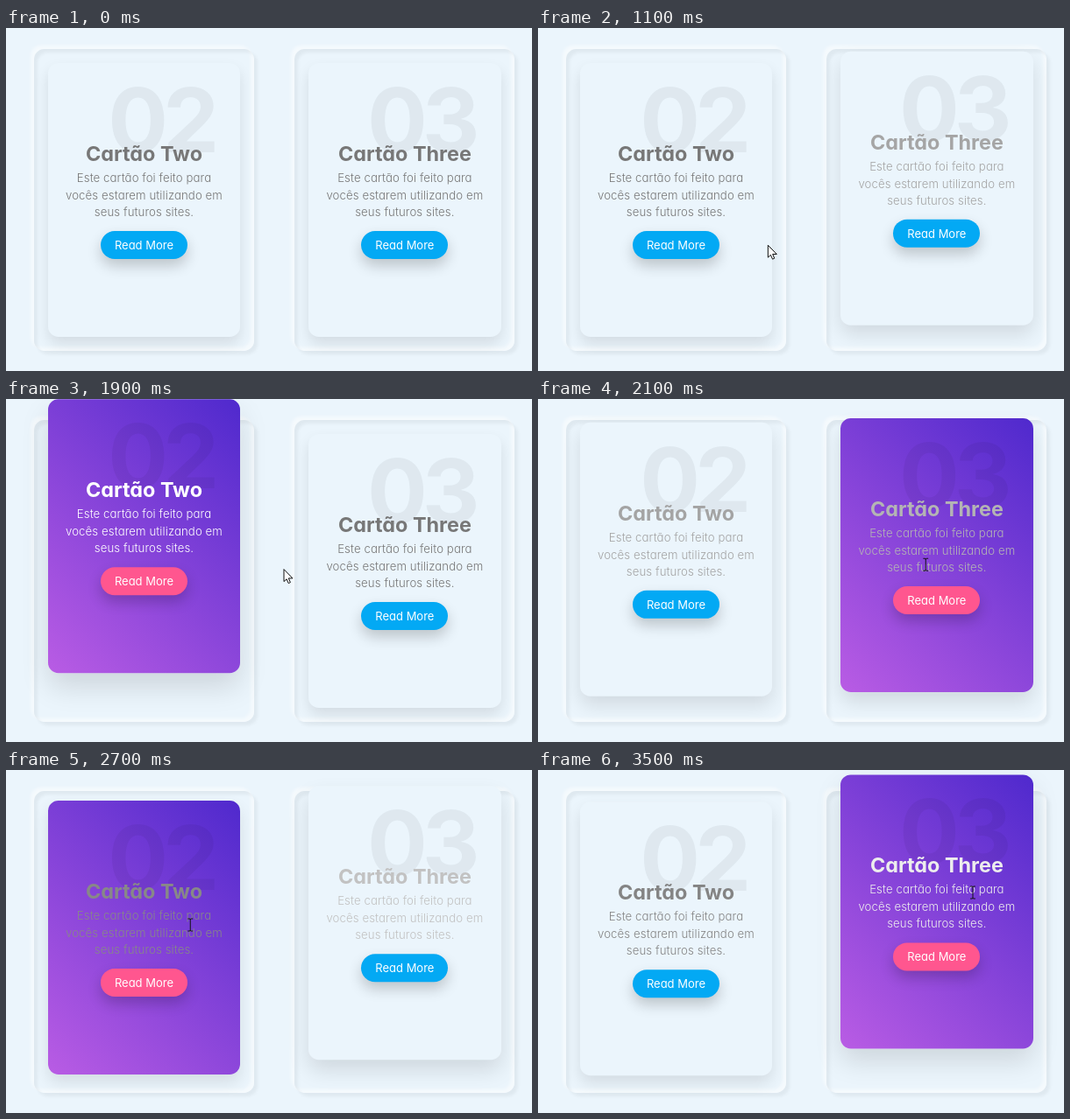
Animation of 600 by 392 pixels, one loop 3600 ms. Source, as an HTML page:

```html
<!DOCTYPE html>
<html lang="pt">
<head>
<meta charset="utf-8">
<title>Cards</title>
<style>
  html, body { margin: 0; width: 100%; height: 100%; overflow: hidden; background: #ebf5fc; }
  body {
    position: relative;
    font-family: Inter, "Open Sans", sans-serif;
    font-feature-settings: "cv11";
    font-optical-sizing: none;
  }
  .card {
    position: absolute; top: 24px; width: 251px; height: 345px; border-radius: 11.8px;
    box-shadow:
      inset 3.9px 3.9px 3.9px rgba(0,0,0,.05), inset -3.9px -3.9px 3.9px rgba(255,255,255,.5),
      3.9px 3.9px 3.9px rgba(0,0,0,.05), -3.9px -3.9px 3.9px rgba(255,255,255,.5);
  }
  .box {
    position: absolute; inset: 15.7px; border-radius: 11.8px;
    background: #ebf5fc; color: #777;
  }
  .box > * { position: absolute; line-height: 0; white-space: nowrap; }
  .title, .line { left: 50%; transform: translateX(-50%); }
  .num { top: 65px; right: 30px; font-size: 102px; font-weight: 700; letter-spacing: -6px; color: rgba(0,0,0,.05); }
  .title { top: 104.6px; font-size: 23.4px; font-weight: 700; }
  .line { font-size: 13.2px; font-weight: 300; letter-spacing: .1px; }
  .box .button {
    top: 192.2px; left: 60.3px; width: 99px; height: 32px; line-height: 32px; border-radius: 16px;
    background: #03a9f4; color: #fff; font-size: 13px; font-weight: 400; text-align: center;
    box-shadow: 0 7.8px 15.7px rgba(0,0,0,.2);
  }
  .box.on { background: linear-gradient(45deg, #b95ce4, #4f29cd); }
  .box.on .button { background: #ff568f; }
  #cursor { position: absolute; left: 0; top: 0; overflow: visible; }
  #cursor path { stroke: #111; stroke-linejoin: round; stroke-linecap: round; }
</style>
</head>
<body>
<svg id="cursor" width="1" height="1">
  <path id="arrow" d="M0 0V13.6L3.1 10.8L5.2 15.6L7.4 14.6L5.3 9.9H9.6Z" fill="#fff"/>
  <path id="hand" d="M1 1.2Q1 -.4 2.4 -.4Q3.7 -.4 3.7 1.2V6Q6 4.6 6.6 6.5Q8.6 5.4 9.2 7.2Q11.8 6.4 11.8 9V12.5Q11.8 14.5 10.5 16.2V18H3V16.2Q.8 14 -.8 11Q-2.6 8.6 -1.4 8Q-.4 7.4 1 9.6Z" fill="#fff"/>
  <path id="beam" d="M-2.5 -7H-1Q0 -7 0 -6Q0 -7 1 -7H2.5M0 -6V6M-2.5 7H-1Q0 7 0 6Q0 7 1 7H2.5" fill="none"/>
</svg>
<script>
const LOOP = 3600, STEP = 100;
const LIFT = 39.7, EASE_TIME = 500;
const LAG = 45;   // hover follows the pointer a little late
const LINES = ["Este cartão foi feito para", "vocês estarem utilizando em", "seus futuros sites."];

const cards = [
  { x: 32, num: "02", title: "Cartão Two" },
  { x: 329.4, num: "03", title: "Cartão Three" }
];

// Key points of the pointer: [time, x, y]
const path = [
  [900, 557, 358], [1050, 300, 262], [1300, 198, 227], [1700, 165, 205], [1900, 317, 195],
  [2200, 470, 186], [2500, 339, 171], [2800, 170, 180], [3100, 237, 177], [3200, 380, 166],
  [3500, 496, 140]
];

const cursor = document.getElementById("cursor");
const shapes = [...cursor.children];
const mix = (a, b, k) => a + (b - a) * k;

function add(parent, cls, text = "") {
  const el = document.createElement("div");
  el.className = cls;
  el.textContent = text;
  parent.append(el);
  return el;
}

function buildCard(c) {
  const card = add(document.body, "card");
  card.style.left = c.x + "px";
  c.box = add(card, "box");
  add(c.box, "num", c.num);
  c.texts = [add(c.box, "title", c.title), ...LINES.map((s, i) => {
    const line = add(c.box, "line", s);
    line.style.top = 131.6 + 19.6 * i + "px";
    return line;
  })];
  c.button = add(c.box, "button", "Read More");
}

// The CSS "ease" curve, cubic-bezier(.25, .1, .25, 1)
function ease(x) {
  if (x <= 0) return 0;
  if (x >= 1) return 1;
  const bez = (a, b, s) => 3 * a * s * (1 - s) ** 2 + 3 * b * s * s * (1 - s) + s ** 3;
  let lo = 0, hi = 1;
  for (let i = 0; i < 24; i++) {
    const mid = (lo + hi) / 2;
    if (bez(.25, .25, mid) < x) lo = mid; else hi = mid;
  }
  return bez(.1, 1, lo);
}

// Smooth curve through the key points; null before the pointer appears
function pointer(t) {
  if (t < path[0][0]) return null;
  const last = path.length - 1;
  const i = Math.max(1, path.findIndex(p => p[0] >= t));
  const slope = (n, axis) => {
    const a = path[Math.max(0, n - 1)], b = path[Math.min(last, n + 1)];
    return (b[axis] - a[axis]) / (b[0] - a[0]);
  };
  const a = path[i - 1], b = path[i], h = b[0] - a[0], k = (t - a[0]) / h;
  return [1, 2].map(axis =>
    mix(a[axis], b[axis], k * k * (3 - 2 * k)) +
    h * k * (1 - k) * ((1 - k) * slope(i - 1, axis) - k * slope(i, axis)));
}

function hoverAt(c, t) {
  const p = pointer(t - LAG);
  return p && p[0] > c.x && p[0] < c.x + 251 ? 1 : 0;
}

const valueAt = (m, t) => mix(m.from, m.to, ease((t - m.start) / m.time));

// Walk the loop once and note each hover change; a reversed move is shortened
function findMoves(c) {
  let move = { start: 0, time: 1, from: 0, to: 0 };
  c.moves = [move];
  for (let t = 0; t < LOOP - STEP; t += 5) {
    const to = hoverAt(c, t);
    if (to === move.to) continue;
    const from = valueAt(move, t);
    move = { start: t, time: EASE_TIME * Math.abs(to - from) || 1, from, to };
    c.moves.push(move);
  }
}

function poseCard(c, t) {
  const move = c.moves.filter(m => m.start <= t).pop();
  const k = valueAt(move, t);
  const grey = Math.round(mix(119, 255, k));
  const s = c.box.style;
  c.box.classList.toggle("on", move.to === 1);
  s.transform = `translateY(${-k * LIFT}px)`;
  s.color = `rgb(${grey},${grey},${grey})`;
  s.boxShadow = `0 ${mix(7.8, 15.7, k)}px ${mix(15.7, 31.4, k)}px rgba(0,0,0,${mix(.1, .13, k)})`;
}

function over(el, x, y, pad = 0) {
  const r = el.getBoundingClientRect();
  return x > r.left && x < r.right && y > r.top - pad && y < r.bottom + pad;
}

function poseCursor(t) {
  const p = pointer(t);
  cursor.style.display = p ? "" : "none";
  if (!p) return;
  const [x, y] = p;
  const onButton = cards.some(c => over(c.button, x, y));
  const onText = cards.some(c => c.texts.some(el => over(el, x, y, 9.8)));
  const kind = onButton ? "hand" : onText ? "beam" : "arrow";
  shapes.forEach(el => { el.style.display = el.id === kind ? "" : "none"; });
  cursor.style.transform = `translate(${x}px,${y}px)`;
}

function render(ms) {
  const t = Math.floor(ms % LOOP / STEP) * STEP;
  cards.forEach(c => poseCard(c, t));
  poseCursor(t);
}

cards.forEach(c => { buildCard(c); findMoves(c); });
document.body.append(cursor);

const begin = performance.now();
function tick() {
  render(performance.now() - begin);
  requestAnimationFrame(tick);
}
tick();
</script>
</body>
</html>
```
